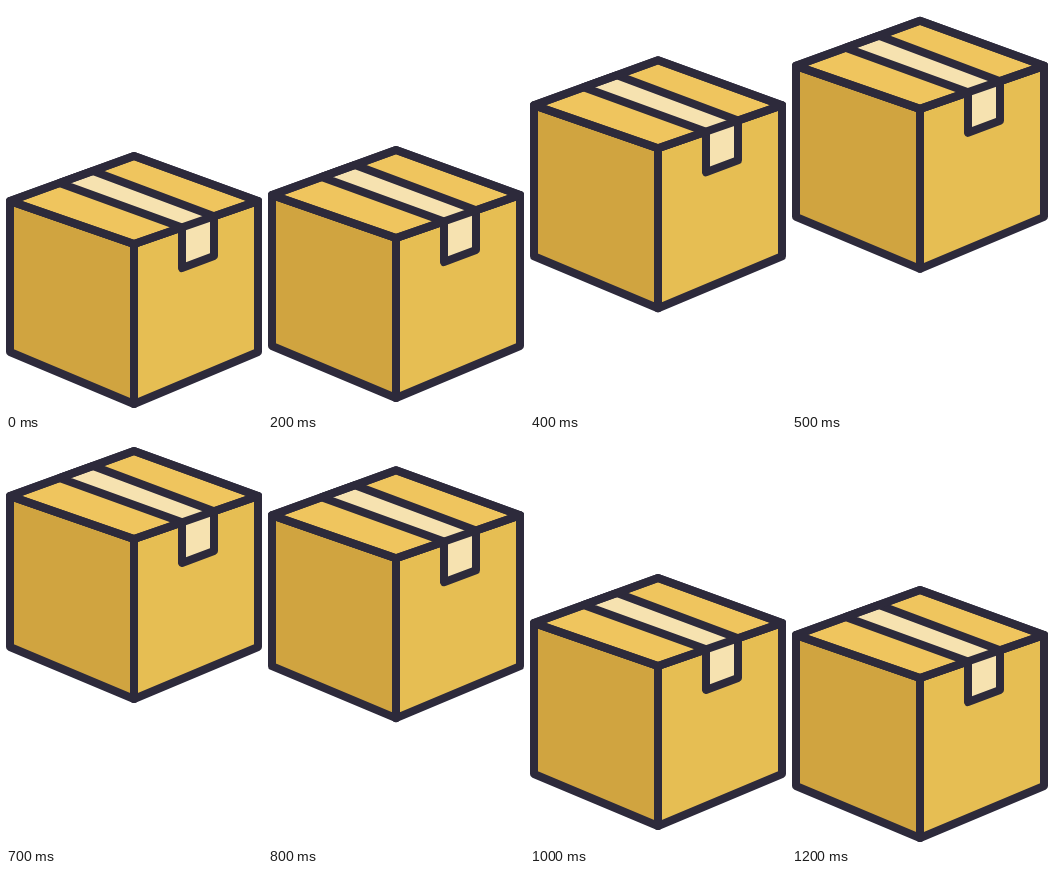
Recreate the animation shown at these times as an HTML page. Size 256 by 406 pixels, loop 1.3 s.

```html
<!DOCTYPE html>
<html lang="en">
<head>
<meta charset="utf-8">
<title>Bouncing box</title>
<style>
  html, body { margin: 0; width: 100%; height: 100%; overflow: hidden; background: #fff; }
  svg { display: block; width: 100%; height: 100%; }
</style>
</head>
<body>
<svg viewBox="0 0 256 406">
  <g id="box" stroke="#2d2a3b" stroke-width="8" stroke-linejoin="round" stroke-linecap="round">
    <path fill="#d0a440" d="M4 195L128 238V398L4 346Z"/>
    <path fill="#e6be53" d="M252 195L128 238V398L252 346Z"/>
    <path fill="#efc55e" d="M128 150L252 195L128 238L4 195Z"/>
    <path fill="#f6e2b0" d="M53.5 177L87 165L208 210.3V250L176 262V221.4Z"/>
    <path fill="none" d="M4 195L128 150L252 195L128 238Z"/>
  </g>
</svg>
<script>
const LOOP = 1300, STEP = 50, HEIGHT = 140.5;
const box = document.getElementById('box');

// Ease with control points (x1, 0) and (x2, 1), solved by bisection.
function ease(x, x1, x2) {
  if (x <= 0) return 0;
  if (x >= 1) return 1;
  let lo = 0, hi = 1;
  for (let i = 0; i < 30; i++) {
    const s = (lo + hi) / 2, r = 1 - s;
    if (3 * x1 * s * r * r + 3 * x2 * s * s * r + s * s * s < x) lo = s;
    else hi = s;
  }
  return lo * lo * (3 - 2 * lo);
}

function draw(now) {
  const t = Math.floor((now % LOOP) / STEP) * STEP;
  const rise = ease((t - 50) / 550, 0.895, 0.357);
  const fall = ease((t - 650) / 520, 0.592, 0.206);
  box.setAttribute('transform', `translate(0 ${HEIGHT * (fall - rise)})`);
}

function tick() {
  draw(performance.now());
  requestAnimationFrame(tick);
}
tick();
</script>
</body>
</html>
```
